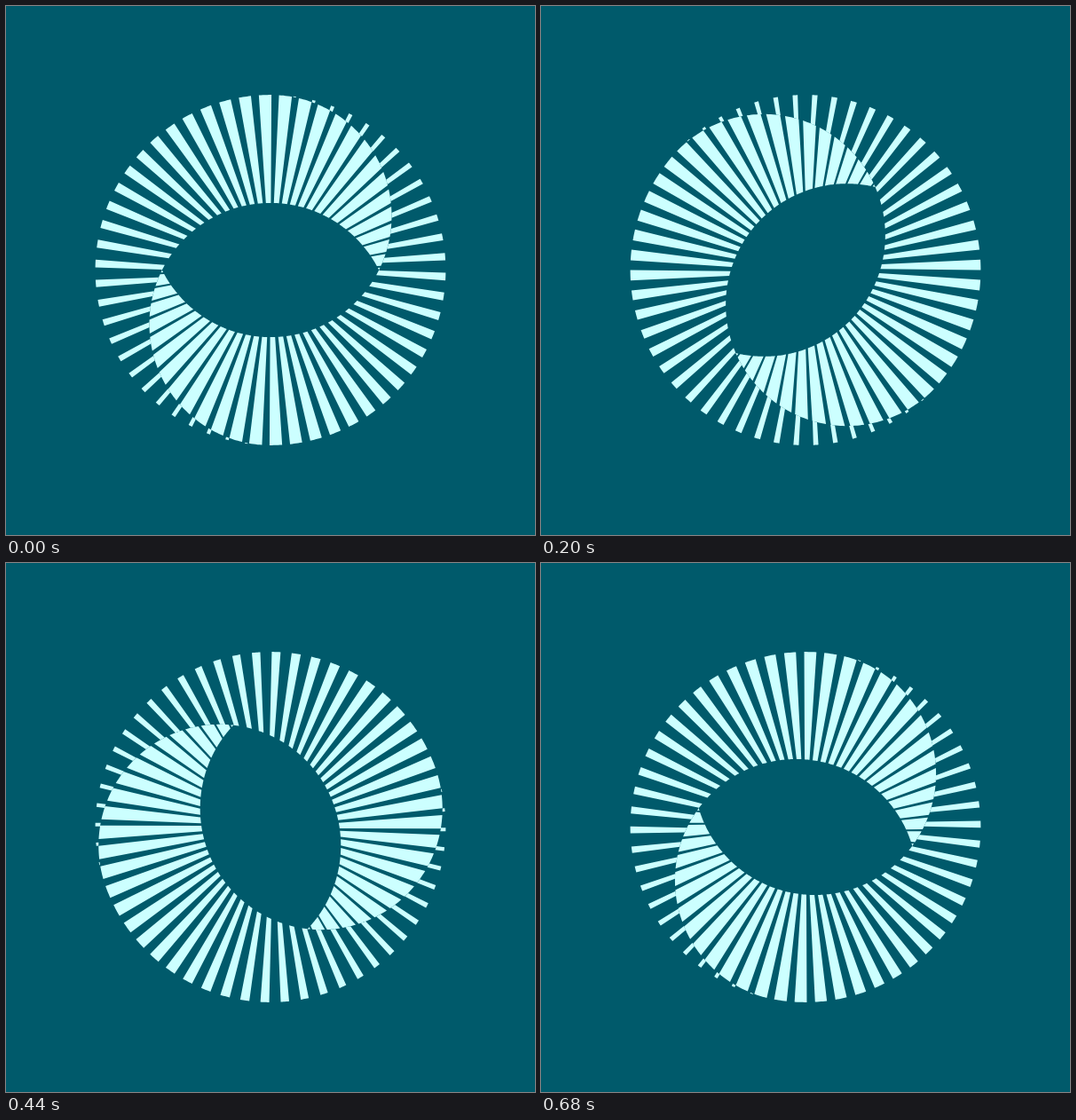
An HTML page with a canvas for the animation above (0.72 s loop, 596 by 596 pixels).

```html
<!DOCTYPE html>
<html lang="en">
<head>
<meta charset="utf-8">
<title>Turning spokes</title>
<style>
  html, body { margin: 0; width: 100%; height: 100%; overflow: hidden; background: #005a6b; }
  canvas { display: block; }
</style>
</head>
<body>
<canvas id="stage" width="596" height="596"></canvas>
<script>
const ctx = document.getElementById('stage').getContext('2d');
const LOOP = 720, STEP = 40;
const RADIUS = 136.5, OFFSET = 60.9, OUTER = RADIUS + OFFSET;
const HUB = 3.6;           // each band's rays start this far above the stage centre
const PITCH = 360 / 55;
const rad = deg => deg * Math.PI / 180;

// Distance from the hub to a circle centred `shift` above it; angle clockwise from the top.
const reach = (deg, shift, radius) => {
  const a = rad(deg), s = shift * Math.sin(a);
  return shift * Math.cos(a) + Math.sqrt(radius * radius - s * s);
};
const rim = deg => reach(deg, -HUB, OUTER);
const inner = deg => deg < 0 ? rim(deg) : reach(deg, OFFSET - HUB, RADIUS);
const outer = deg => Math.max(inner(deg),
  deg < 180 ? rim(deg) : reach(deg, -OFFSET - HUB, RADIUS));

function addSpoke(band, from, to) {
  const parts = 6;
  const points = [];
  const add = (deg, r) => points.push([r * Math.sin(rad(deg)), -HUB - r * Math.cos(rad(deg))]);
  const at = i => from + (to - from) * i / parts;
  for (let i = 0; i <= parts; i++) add(at(i), outer(at(i)));
  for (let i = parts; i >= 0; i--) add(at(i), inner(at(i)));
  points.forEach(([x, y], i) => i ? band.lineTo(x, y) : band.moveTo(x, y));
  band.closePath();
}

// Spokes widen steadily along three quarters of a turn.
const band = new Path2D();
for (let mid = 1.55; mid < 274; mid += PITCH) {
  const half = PITCH * (1 / 8 + mid / 360) / 2;
  addSpoke(band, mid - half, mid + half);
}

function draw() {
  const step = Math.floor(performance.now() % LOOP / STEP + 0.01);
  ctx.setTransform(1, 0, 0, 1, 0, 0);
  ctx.fillStyle = '#005a6b';
  ctx.fillRect(0, 0, 596, 596);
  ctx.translate(298, 297.5);
  ctx.rotate(-Math.PI * step * STEP / LOOP);
  ctx.fillStyle = '#ccffff';
  ctx.fill(band);
  ctx.rotate(Math.PI);
  ctx.fill(band);
  requestAnimationFrame(draw);
}
draw();
</script>
</body>
</html>
```
